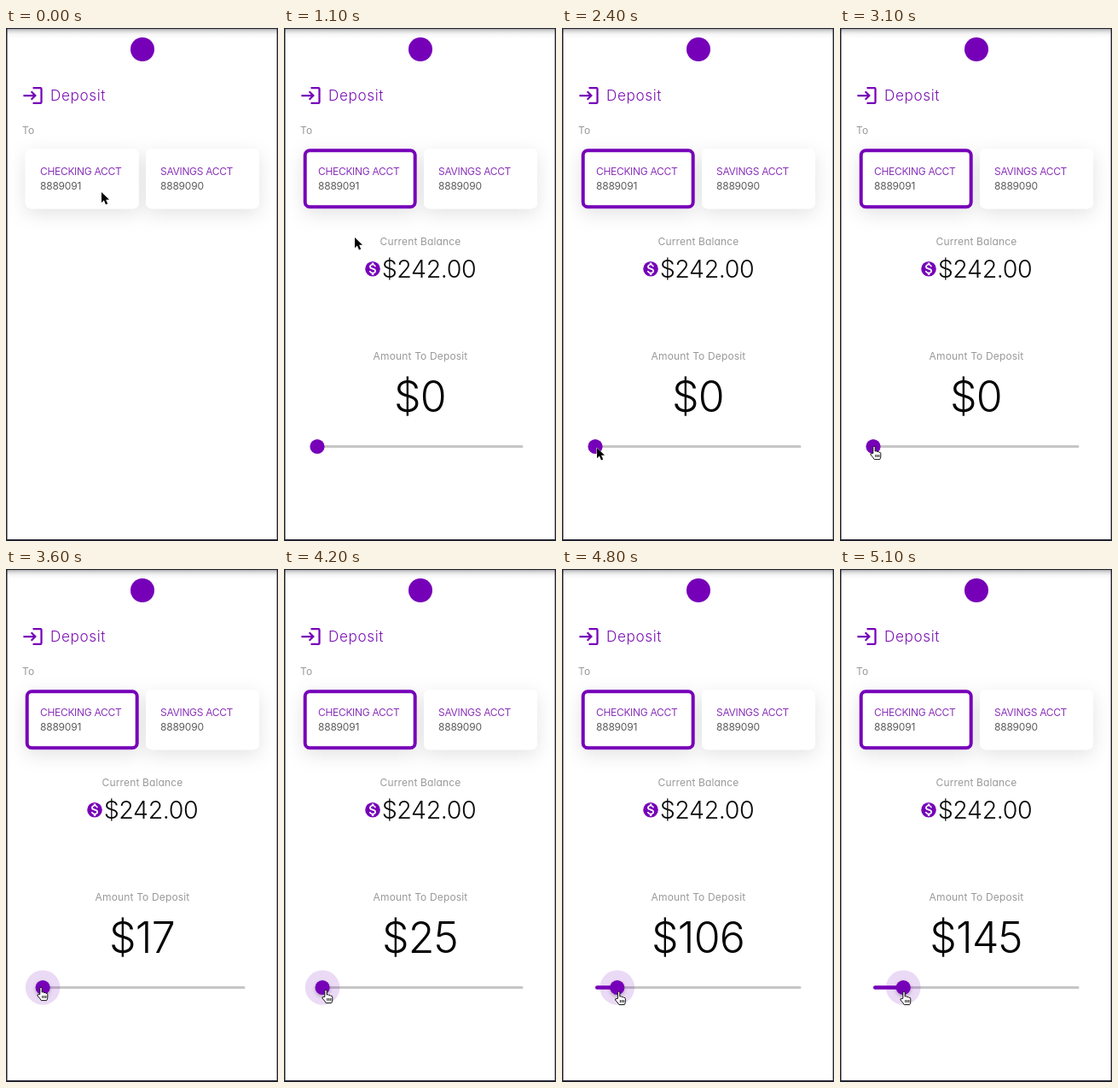
Write an HTML page that moves like this. It is 319 px wide and 600 px high and loops after 5200 ms.

```html
<!DOCTYPE html>
<html lang="en">
<head>
<meta charset="utf-8">
<title>Deposit</title>
<style>
  html, body { margin: 0; width: 100%; height: 100%; overflow: hidden; background: #fff; }
  svg { display: block; width: 100vw; height: 100vh; }
  text { font-family: Inter, "Open Sans", sans-serif; font-feature-settings: "cv11"; font-size: 12px; }
  .accent { fill: #7600b8; }
  .title { fill: #7c14b4; font-size: 17.2px; font-weight: 350; letter-spacing: .6px; }
  .kind { fill: #8a32ba; letter-spacing: -.32px; }
  .number { fill: #5c5c5c; letter-spacing: -.22px; }
  .label { fill: #999; letter-spacing: .15px; }
  .mid { text-anchor: middle; }
  .balance { font-size: 28.6px; font-weight: 350; letter-spacing: -.4px; fill: #0c0c0c; }
  .amount { font-size: 50px; font-weight: 350; letter-spacing: -.8px; fill: #050505; }
</style>
</head>
<body>
<svg viewBox="0 0 319 600" preserveAspectRatio="none">
  <defs>
    <linearGradient id="barShade" x1="0" y1="0" x2="0" y2="1">
      <stop offset="0" stop-color="#30303c" stop-opacity=".6"/>
      <stop offset=".25" stop-color="#555" stop-opacity=".26"/>
      <stop offset=".6" stop-color="#777" stop-opacity=".07"/>
      <stop offset="1" stop-color="#888" stop-opacity="0"/>
    </linearGradient>
    <filter id="soft" x="-30%" y="-60%" width="160%" height="240%">
      <feDropShadow dx="0" dy="6" stdDeviation="10.5" flood-color="#000" flood-opacity=".11"/>
    </filter>
    <filter id="lift" x="-50%" y="-50%" width="200%" height="200%">
      <feDropShadow dx="0" dy="2" stdDeviation="2" flood-color="#000" flood-opacity=".25"/>
    </filter>
  </defs>

  <rect width="319" height="600" fill="#fff"/>
  <rect width="319" height="12" fill="url(#barShade)"/>
  <circle class="accent" cx="160" cy="25" r="14"/>

  <path class="accent" transform="translate(18.2 65.7) scale(1.11)"
    d="M11 7 9.6 8.4l2.6 2.6H2v2h10.2l-2.6 2.6L11 17l5-5zM20 19h-8v2h8a2 2 0 0 0 2-2V5a2 2 0 0 0-2-2h-8v2h8z"/>
  <text class="title" x="52" y="85.2">Deposit</text>
  <text class="label" x="19" y="123.5">To</text>

  <g filter="url(#soft)" fill="#fff">
    <rect x="22.7" y="141.3" width="133" height="70" rx="7"/>
    <rect x="164" y="141.3" width="133" height="70" rx="7"/>
  </g>
  <text class="kind" x="40" y="171.5">CHECKING ACCT</text>
  <text class="number" x="40" y="189.3">8889091</text>
  <text class="kind" x="181" y="171.5">SAVINGS ACCT</text>
  <text class="number" x="181" y="189.3">8889090</text>

  <g id="form">
    <rect x="24.7" y="143.3" width="129" height="66" rx="5.5" fill="none" stroke="#7600b8" stroke-width="4"/>
    <text class="label mid" x="160" y="254">Current Balance</text>
    <circle class="accent" cx="104" cy="281.7" r="8.8"/>
    <path fill="#fff" transform="translate(93.2 270.9) scale(.9)"
      d="M13.41 18.09V20h-2.67v-1.93c-1.71-.36-3.16-1.46-3.27-3.4h1.96c.1 1.05.82 1.87 2.65 1.87 1.96 0 2.4-.98 2.4-1.59 0-.83-.44-1.61-2.67-2.14-2.48-.6-4.18-1.62-4.18-3.67 0-1.72 1.39-2.84 3.11-3.21V4h2.67v1.95c1.86.45 2.79 1.86 2.85 3.39H14.3c-.05-1.11-.64-1.87-2.22-1.87-1.5 0-2.4.68-2.4 1.64 0 .84.65 1.39 2.67 1.91s4.18 1.39 4.18 3.91c-.02 1.83-1.39 2.83-3.12 3.16z"/>
    <text class="balance mid" x="170" y="291.8">$242.00</text>
    <text class="label mid" x="160" y="388">Amount To Deposit</text>
    <text class="amount mid" id="amount" x="159.5" y="448.7">$0</text>
    <rect x="39" y="488" width="241.5" height="3" rx="1.5" fill="#c6c6c6"/>
    <rect class="accent" id="fill" x="39" y="487.3" height="4.5" rx="2.2"/>
    <g id="thumb">
      <circle id="halo" r="20.3" fill="#7600b8" fill-opacity=".145"/>
      <circle class="accent" id="knob" r="8.6"/>
    </g>
  </g>

  <path fill="#20222f" d="M0 0H319V600H0ZM1.5 1V598H317.6V1Z" fill-rule="evenodd"/>

  <path id="arrow" d="M0 0V12.2L2.9 9.6 5 14.4 7.2 13.4 5.1 8.8H9Z"
    fill="#000" stroke="#fff" stroke-width="1" paint-order="stroke"/>
  <path id="hand" fill="#fff" stroke="#111" stroke-width="1" stroke-linejoin="round"
    d="M-1.2 8.4V1.5a1.2 1.2 0 0 1 2.4 0V6q2-.8 2.3.6 2-.6 2.3.7 2-.4 2 1.4V12q0 2-1.2 3.6H.3Q-1.1 13.3-4.1 10q-.2-1.8 1.4-1.4zM1.8 10v3M3.8 10v3M5.8 10v3"/>
</svg>
<script>
  const LOOP = 5200, STEP = 100;
  const SHOW = 300, GRAB = 3600, HAND = 2500;
  const TRACK_X = 39, PX_PER_DOLLAR = 0.243;

  // Rows: time, then the values at that time
  const pointer = [
    [0, 112, 192], [800, 112, 192], [900, 108, 200], [1000, 98, 221], [1100, 83, 245],
    [1400, 20, 399], [1500, 21, 412], [1800, 36, 494], [2000, 41, 491], [2400, 41, 491],
    [2700, 41, 489], [2800, 41, 489], [3100, 40, 489], [3400, 41, 489], [3700, 41, 489],
    [4200, 49, 492], [4600, 61, 494], [5100, 75, 494]
  ];
  const dollars = [
    [GRAB, 17], [3700, 17], [4200, 25], [4300, 35], [4600, 80], [5100, 145]
  ];

  const $ = id => document.getElementById(id);
  const show = (id, on) => $(id).setAttribute("display", on ? "inline" : "none");
  const move = (id, x, y) => $(id).setAttribute("transform", `translate(${x} ${y})`);

  function sample(track, t) {
    const next = track.findIndex(row => row[0] > t);
    if (next === 0) return track[0].slice(1);
    if (next < 0) return track[track.length - 1].slice(1);
    const a = track[next - 1], b = track[next];
    const k = (t - a[0]) / (b[0] - a[0]);
    return a.slice(1).map((v, i) => v + (b[i + 1] - v) * k);
  }

  function draw(time) {
    const t = Math.floor((time % LOOP) / STEP) * STEP;
    const held = t >= GRAB;
    const amount = held ? Math.round(sample(dollars, t)[0]) : 0;
    const offset = amount * PX_PER_DOLLAR;
    const [x, y] = sample(pointer, t);

    show("form", t >= SHOW);
    $("amount").textContent = "$" + amount;
    $("fill").setAttribute("width", offset);
    move("thumb", TRACK_X + offset, 489.5);
    show("halo", held);
    $("knob").setAttribute("filter", held ? "url(#lift)" : "none");

    show("arrow", t < HAND);
    show("hand", t >= HAND);
    move(t < HAND ? "arrow" : "hand", x, y);
  }

  const start = performance.now();
  function tick() {
    draw(performance.now() - start);
    requestAnimationFrame(tick);
  }
  tick();
</script>
</body>
</html>
```
